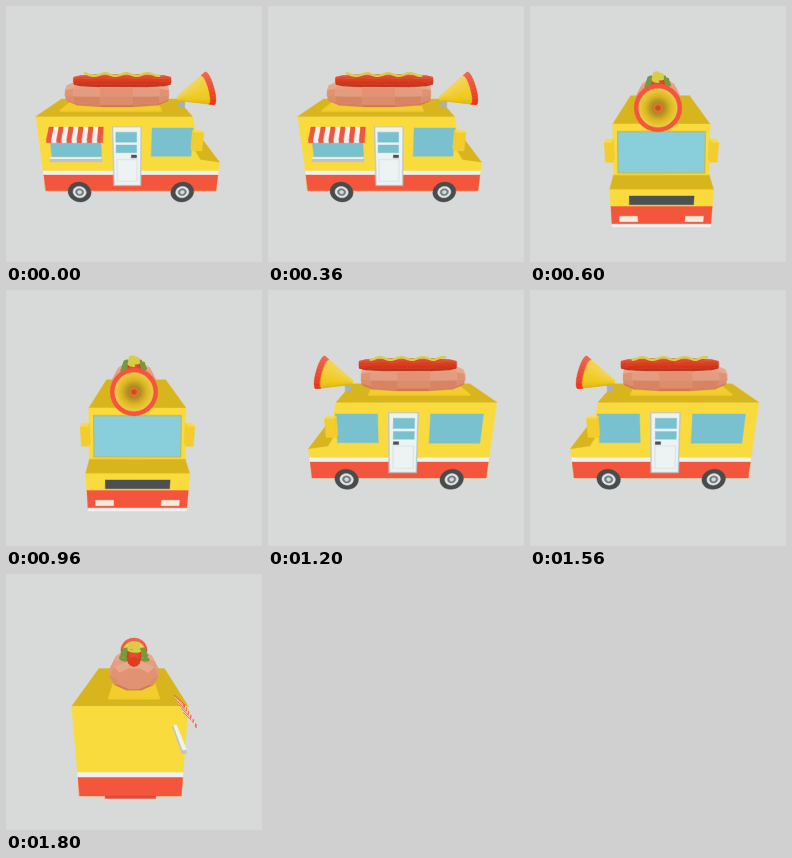
An HTML page with a canvas for the animation above (2400 ms loop, 256x256 px).

```html
<!DOCTYPE html>
<html lang="en">
<head>
<meta charset="utf-8">
<title>Hot dog truck turntable</title>
<style>
html, body { margin: 0; width: 100%; height: 100%; overflow: hidden; background: #d8dad9; }
canvas { display: block; width: 100vw; height: 100vh; }
</style>
</head>
<body>
<canvas id="stage"></canvas>
<script>
const canvas = document.getElementById('stage');
const ctx = canvas.getContext('2d');
const HOLD = 600, SIZE = 256, TAU = Math.PI * 2;
const PITCH = 0.331, FOCAL = 243, DISTANCE = 6.2, RISE = 0.65;
const C = {
  bg: '#d8dad9', yellow: '#fadb3e', gold: '#f3cd2b', roof: '#d8b51d', red: '#f4563d',
  deepRed: '#d93b24', white: '#edf2f3', grey: '#bcc6c9', dark: '#4b5053', glass: '#7ac1cf'
};

// Model axes: x towards the cab, y up from the roof, z towards the awning side.
const REAR = -2.15, NOSE = 2, RIGHT = 0.93, LEFT = -1.07, MIDDLE = (LEFT + RIGHT) / 2;
const FLOOR = -1.87;
const cabX = y => 1.28 - 0.262 * y;
const sides = {
  right: (a, y) => [a, y, RIGHT],
  left: (a, y) => [-a, y, LEFT],
  shield: (a, y) => [cabX(y), y, MIDDLE - a],
  nose: (a, y) => [NOSE, y, MIDDLE - a],
  rear: (a, y) => [REAR, y, MIDDLE + a]
};

let turn = { cos: 1, sin: 0 };
const nearness = (x, z) => x * turn.sin + z * turn.cos;

function project([x, y, z]) {
  const near = nearness(x, z);
  const scale = FOCAL / (DISTANCE - near * Math.cos(PITCH) - y * Math.sin(PITCH));
  const horizon = 126.5 + 3 * Math.abs(turn.sin);
  return [
    SIZE / 2 + scale * (x * turn.cos - z * turn.sin),
    horizon - scale * (RISE + y * Math.cos(PITCH) - near * Math.sin(PITCH))
  ];
}

// Faces list their corners clockwise as seen from outside.
function face(color, points, twoSided = false) {
  const flat = points.map(project);
  const area = flat.reduce((sum, [x, y], i) => {
    const [nx, ny] = flat[(i + 1) % flat.length];
    return sum + x * ny - nx * y;
  }, 0);
  if (area <= 0 && !twoSided) return;
  ctx.fillStyle = ctx.strokeStyle = color;
  ctx.lineWidth = 0.4;
  ctx.lineJoin = 'round';
  ctx.beginPath();
  flat.forEach(p => ctx.lineTo(...p));
  ctx.closePath();
  ctx.fill();
  ctx.stroke();
}

function panel(side, color, a1, a2, top, bottom) {
  const [l, r] = [Math.min(a1, a2), Math.max(a1, a2)];
  face(color, [side(l, top), side(r, top), side(r, bottom), side(l, bottom)]);
}

function disc(side, color, a, y, r) {
  face(color, Array.from({ length: 28 }, (_, i) =>
    side(a + r * Math.cos(i / 28 * TAU), y - r * Math.sin(i / 28 * TAU))));
}

function block([x, X], [y, Y], [z, Z], color, topColor = color) {
  face(topColor, [[x, Y, z], [X, Y, z], [X, Y, Z], [x, Y, Z]]);
  face(color, [[x, Y, Z], [X, Y, Z], [X, y, Z], [x, y, Z]]);
  face(color, [[X, Y, z], [x, Y, z], [x, y, z], [X, y, z]]);
  face(color, [[X, Y, Z], [X, Y, z], [X, y, z], [X, y, Z]]);
  face(color, [[x, Y, z], [x, Y, Z], [x, y, Z], [x, y, z]]);
}

function ring(x, y, r, { flat = 1, tilt = 0, count = 10 } = {}) {
  return Array.from({ length: count }, (_, i) => {
    const angle = i / count * TAU, up = r * flat * Math.sin(angle);
    return [x - up * Math.sin(tilt), y + up * Math.cos(tilt), r * Math.cos(angle)];
  });
}

function tube(a, b, colorAt) {
  a.forEach((_, j) => {
    const k = (j + 1) % a.length;
    face(colorAt(Math.sin((j + 0.5) / a.length * TAU), j), [a[k], b[k], b[j], a[j]]);
  });
}

// A rounded bar along x, closed at both ends.
function bar(x1, x2, y, r, steps, options, colorAt) {
  const rings = Array.from({ length: steps + 1 }, (_, i) => {
    const u = -Math.cos(i / steps * Math.PI);
    return ring((x1 + x2) / 2 + u * (x2 - x1) / 2, y, r * (1 - 0.4 * u ** 6), options);
  });
  for (let i = 0; i < steps; i++) tube(rings[i], rings[i + 1], (up, j) => colorAt(up, i + j));
  face(colorAt(0.3, 0), rings[steps]);
  face(colorAt(0.3, 0), [...rings[0]].reverse());
}

function wave(color, width, x1, x2, y, z, swing) {
  ctx.strokeStyle = color;
  ctx.lineWidth = width;
  ctx.lineCap = ctx.lineJoin = 'round';
  ctx.beginPath();
  for (let i = 0; i <= 40; i++) {
    const phase = i / 40 * TAU * 3.5;
    ctx.lineTo(...project([x1 + (x2 - x1) * i / 40, y + 0.03 * Math.cos(phase), z + swing * Math.sin(phase)]));
  }
  ctx.stroke();
}

function drawShell() {
  const profile = [[REAR, 0], [cabX(0), 0], [cabX(-1.03), -1.03], [NOSE, -1.1], [NOSE, FLOOR], [REAR, FLOOR]];
  const colors = [C.roof, C.yellow, C.roof, C.yellow, C.deepRed, C.yellow];
  const at = z => profile.map(([x, y]) => [x, y, z]);
  const right = at(RIGHT), left = at(LEFT);
  face(C.yellow, right);
  face(C.yellow, [...left].reverse());
  colors.forEach((color, i) => {
    const k = (i + 1) % profile.length;
    face(color, [left[i], left[k], right[k], right[i]]);
  });
}

function drawSide(side, dir) {
  const part = (color, x1, x2, top, bottom) => panel(side, color, dir * x1, dir * x2, top, bottom);
  part(C.white, REAR, NOSE, -1.33, -1.44);
  part(C.red, REAR, NOSE, -1.44, FLOOR);
  part(C.glass, 0.4, 1.32, -0.26, -0.95);
  part(C.glass, -1.9, -0.75, -0.26, -0.96);
  if (dir > 0) part(C.yellow, -1.9, -0.75, -0.26, -0.4);
  part(C.grey, -0.49, 0.17, -0.23, -1.73);
  part(C.white, -0.46, 0.14, -0.25, -1.7);
  part(C.glass, -0.41, 0.06, -0.36, -0.6);
  part(C.glass, -0.41, 0.06, -0.67, -0.86);
  part('#dce4e7', -0.41, 0.08, -1.02, -1.62);
  part(C.white, -0.38, 0.05, -1.05, -1.59);
  part(C.dark, -0.06, 0.06, -0.92, -0.99);
  for (const x of [-1.33, 1.18]) {
    disc(side, '#484c4f', dir * x, -1.91, 0.28);
    disc(side, '#dfe3e2', dir * x, -1.91, 0.16);
    disc(side, '#74797b', dir * x, -1.91, 0.1);
    disc(side, '#d5d9d8', dir * x, -1.91, 0.05);
  }
}

function drawEnds() {
  const { shield, nose, rear } = sides;
  panel(shield, '#d0b431', -0.91, 0.91, -0.14, -0.99);
  panel(shield, '#88cedb', -0.89, 0.89, -0.16, -0.97);
  panel(nose, C.dark, -0.63, 0.63, -1.24, -1.44);
  panel(nose, C.red, -1, 1, -1.48, -1.9);
  panel(nose, C.white, -1, 1, -1.9, -1.97);
  for (const a of [-0.66, 0.66]) panel(nose, '#f0eee1', a - 0.18, a + 0.18, -1.71, -1.84);
  panel(rear, C.white, -1, 1, -1.33, -1.43);
  panel(rear, C.red, -1, 1, -1.44, FLOOR);
  panel(rear, '#e14b37', -0.5, 0.5, FLOOR, -1.93);
}

function drawBody() {
  drawShell();
  drawSide(sides.right, 1);
  drawSide(sides.left, -1);
  drawEnds();
}

function drawAwning() {
  const from = -1.89, stripes = 11, step = 1.21 / stripes;
  for (let i = 0; i < stripes; i++) {
    const x = from + i * step, X = x + step, color = i % 2 ? '#f5f1ec' : '#ef5540';
    face(color, [[x, -0.24, RIGHT], [X, -0.24, RIGHT], [X, -0.46, 1.17], [x, -0.46, 1.17]], true);
    face(color, [[x, -0.46, 1.17], [X, -0.46, 1.17], [X, -0.52, 1.17], [x, -0.52, 1.17]], true);
  }
  block([-1.93, -0.74], [-1.05, -0.98], [RIGHT, 1.02], C.grey, C.white);
}

function drawMirror(z) {
  block([1.3, 1.52], [-0.75, -0.32], [z, z + 0.15], C.gold, C.yellow);
}

function drawHotDog() {
  block([-1.75, 0.65], [0, 0.03], [-0.48, 0.48], C.gold, C.gold);
  bar(-1.64, 0.83, 0.36, 0.54, 5, { flat: 0.62 },
    (up, n) => `hsl(17 ${62 + 6 * up}% ${64 + 8 * up + 3 * (n % 2)}%)`);
  for (const z of [-0.2, 0.2]) wave('#78983c', 3, -1.4, 0.6, 0.66, z, 0.08);
  bar(-1.47, 0.9, 0.66, 0.15, 6, { count: 12 }, up => `hsl(9 76% ${48 + 7 * up}%)`);
  wave('#d8ce45', 2.4, -1.2, 0.62, 0.81, 0, 0.12);
}

function drawMegaphone() {
  block([1.15, 1.28], [0, 0.25], [-0.06, 0.06], '#aab1b1');
  const tilt = 0.31, count = 28;
  const cut = (s, r) => ring(1.1 + 0.78 * s, 0.22 + 0.25 * s, r, { tilt, count });
  const collar = cut(0.86, 0.37), mouth = cut(1, 0.42);
  face(C.gold, cut(0, 0.05).reverse());
  tube(cut(0, 0.05), collar, up => `hsl(49 88% ${54 + 9 * up}%)`);
  tube(collar, mouth, up => `hsl(9 84% ${55 + 6 * up}%)`);
  face(C.red, mouth);
  for (let i = 0; i <= 8; i++) face(`hsl(48 ${80 - i * 2}% ${59 - i * 2.5}%)`, cut(1, 0.34 - i * 0.03));
  face('#e8702f', cut(1, 0.09));
  face('#b95624', cut(1, 0.045));
}

const parts = [
  { x: 0, z: 0, draw: drawBody },
  { x: -1.3, z: 1.05, draw: drawAwning },
  { x: 1.41, z: 1, draw: () => drawMirror(RIGHT) },
  { x: 1.41, z: -1.15, draw: () => drawMirror(LEFT - 0.15) }
];
const roofParts = [
  { x: -0.4, z: 0, draw: drawHotDog },
  { x: 1.5, z: 0, draw: drawMegaphone }
];

function drawSorted(list) {
  [...list].sort((a, b) => nearness(a.x, a.z) - nearness(b.x, b.z)).forEach(part => part.draw());
}

function draw(now) {
  const ratio = devicePixelRatio || 1;
  const w = Math.round(innerWidth * ratio), h = Math.round(innerHeight * ratio);
  if (canvas.width !== w || canvas.height !== h) {
    canvas.width = w;
    canvas.height = h;
  }
  ctx.setTransform(w / SIZE, 0, 0, h / SIZE, 0, 0);
  ctx.fillStyle = C.bg;
  ctx.fillRect(0, 0, SIZE, SIZE);
  const angle = Math.floor(now / HOLD) % 4 * TAU / 4;
  turn = { cos: Math.round(Math.cos(angle)), sin: Math.round(Math.sin(angle)) };
  drawSorted(parts);
  drawSorted(roofParts);
  requestAnimationFrame(draw);
}
draw(performance.now());
</script>
</body>
</html>
```
